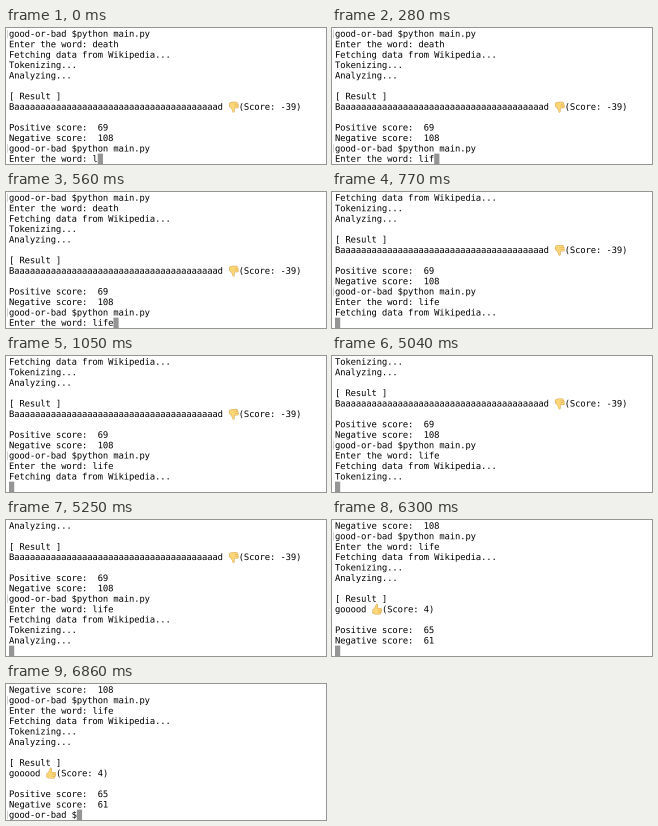
Animation of 320 by 136 pixels, one loop 9660 ms. Source, as an HTML page with a canvas:

```html
<!DOCTYPE html>
<html lang="en">
<head>
<meta charset="utf-8">
<title>good-or-bad</title>
<style>
  html, body { margin: 0; width: 100%; height: 100%; overflow: hidden; background: #fff; }
  canvas { display: block; width: 100vw; height: 100vh; }
</style>
</head>
<body>
<canvas id="screen"></canvas>
<script>
const W = 320, H = 136, LOOP = 9660, DETAIL = 4;
const ROWS = 13, LEFT = 3, TOP = 0.6, CELL = 5.22, PITCH = 10.42;
const PROMPT = 'good-or-bad $', ASK = 'Enter the word: ';
const UP = '\u{1F44D}', DOWN = '\u{1F44E}';

const canvas = document.getElementById('screen');
const screen2d = canvas.getContext('2d');
const ratio = window.devicePixelRatio || 1;
canvas.width = W * ratio;
canvas.height = H * ratio;

// Drawn large and scaled down, so glyphs keep fractional positions and soft edges.
const buffer = document.createElement('canvas');
const ctx = buffer.getContext('2d');
buffer.width = W * DETAIL;
buffer.height = H * DETAIL;
ctx.scale(DETAIL, DETAIL);
ctx.font = '8.85px "DejaVu Sans Mono", monospace';
ctx.letterSpacing = '-0.108px';

const result = (word, thumb, score, good, bad) => [
  '', '[ Result ]', `${word} ${thumb}(Score: ${score})`, '',
  `Positive score:  ${good}`, `Negative score:  ${bad}`
];

const history = [
  PROMPT + 'python main.py', ASK + 'death',
  'Fetching data from Wikipedia...', 'Tokenizing...', 'Analyzing...',
  ...result('B' + 'a'.repeat(39) + 'd', DOWN, -39, 69, 108),
  PROMPT + 'python main.py'
];

const keyTimes = [0, 210, 280, 420];
const output = [
  [770, ['Fetching data from Wikipedia...']],
  [4970, ['Tokenizing...']],
  [5250, ['Analyzing...']],
  [6300, result('g' + 'o'.repeat(4) + 'd', UP, 4, 65, 61)]
];

// The last line returned is the one holding the cursor.
function linesAt(t) {
  const typed = keyTimes.filter(k => k <= t).length;
  const lines = [...history, ASK + 'life'.slice(0, typed)];
  for (const [time, added] of output) if (t >= time) lines.push(...added);
  if (t >= 6440) lines.push(PROMPT);
  else if (t >= 770) lines.push('');
  return lines;
}

function drawThumb(x, y, down) {
  ctx.save();
  ctx.translate(x + 5.6, y + 5.4);
  if (down) ctx.scale(1, -1);
  ctx.beginPath();
  ctx.moveTo(-4.6, 0.4);
  ctx.quadraticCurveTo(-1.9, -1.2, -1.2, -4.6);
  ctx.quadraticCurveTo(-0.6, -6.2, 0.4, -5);
  ctx.quadraticCurveTo(1, -3.4, 0.4, -1.2);
  ctx.lineTo(3.8, -1.1);
  ctx.quadraticCurveTo(5.2, -0.4, 4.4, 1);
  ctx.quadraticCurveTo(4.8, 2.2, 3.9, 3);
  ctx.quadraticCurveTo(3.8, 5, 2, 5);
  ctx.lineTo(-1.2, 4.9);
  ctx.quadraticCurveTo(-3.6, 4.6, -4.6, 3.6);
  ctx.closePath();
  ctx.fillStyle = '#fbd677';
  ctx.fill();
  ctx.lineWidth = 0.4;
  ctx.strokeStyle = '#cf9a48';
  ctx.stroke();
  ctx.beginPath();
  for (const fold of [0.9, 2.8]) {
    ctx.moveTo(0.8, fold);
    ctx.lineTo(4.1, fold);
  }
  ctx.stroke();
  ctx.restore();
}

function drawLine(line, y) {
  if (line.startsWith(PROMPT)) {
    ctx.fillStyle = '#c4c4c4';
    ctx.fillRect(1, y + 1, 0.7, PITCH - 2);
  }
  ctx.fillStyle = '#000';
  const thumb = [UP, DOWN].find(mark => line.includes(mark));
  const [before, after] = thumb ? line.split(thumb) : [line];
  ctx.fillText(before, LEFT, y + 8.2);
  if (!thumb) return;
  const x = LEFT + before.length * CELL;
  ctx.fillText(after, x + 2 * CELL, y + 8.2);
  drawThumb(x, y, thumb === DOWN);
}

function draw(t) {
  ctx.fillStyle = '#fff';
  ctx.fillRect(0, 0, W, H);

  const rows = linesAt(t).slice(-ROWS);
  rows.forEach((line, i) => drawLine(line, TOP + i * PITCH));

  const cursorX = LEFT + rows[ROWS - 1].length * CELL;
  ctx.fillStyle = '#959595';
  ctx.fillRect(cursorX, TOP + (ROWS - 1) * PITCH, CELL, PITCH);

  screen2d.imageSmoothingQuality = 'high';
  screen2d.drawImage(buffer, 0, 0, canvas.width, canvas.height);
}

const start = performance.now();
function tick() {
  draw((performance.now() - start) % LOOP);
  requestAnimationFrame(tick);
}
tick();
</script>
</body>
</html>
```
